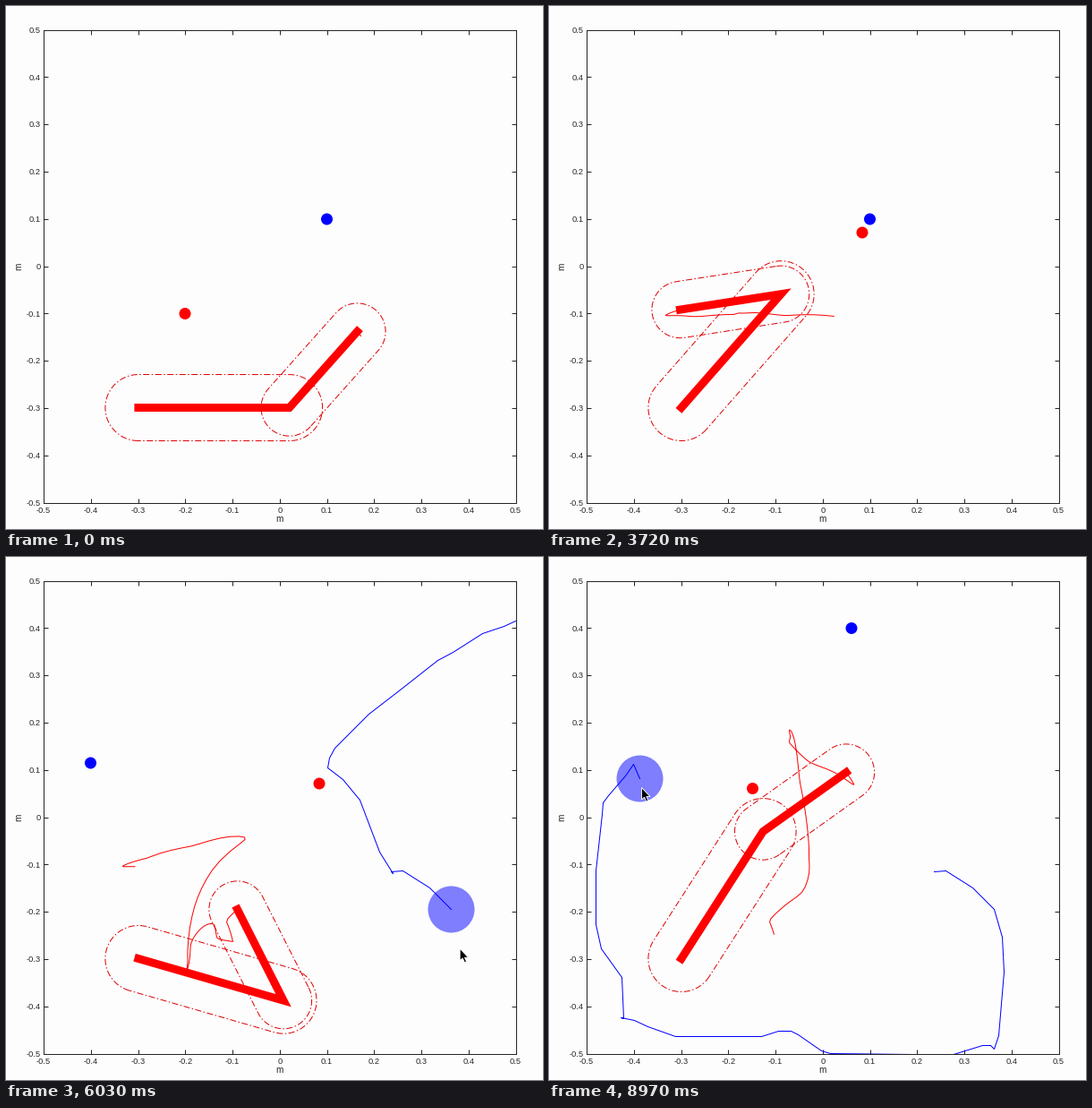
A matplotlib script for the animation above (9 s loop, 600x584 px).

```python
import numpy as np
import matplotlib.pyplot as plt
from matplotlib.animation import FuncAnimation
from matplotlib.patches import Circle, Polygon, Rectangle

W, H, DPI = 600, 584, 100
STEP, COUNT = 30, 300
PX = 72 / DPI                      # one pixel in points
LEFT, RIGHT, TOP, BOTTOM = 41.5, 569, 26, 554
TICK = (RIGHT - LEFT) / 10
INK = '#262626'

BASE = np.array([147.4, 448.0])
L1, L2 = 168.7, 114.0              # link lengths
R1, R2 = 37.0, 31.6                # safety radii
TRAIL = 3100                       # trail memory in ms
LEAD = 60                          # pointer runs ahead of the disc
SHOW = 3750                        # disc appears
FLIP = 6870                        # elbow changes side


def timed(t, start, strokes):
    """Rows of time, x, y; each stroke runs at even speed to its end time."""
    rows = [(t, *start)]
    for end, *points in strokes:
        path = np.array([rows[-1][1:], *points], float)
        run = np.cumsum(np.hypot(*np.diff(path, axis=0).T))
        part = run / run[-1] if run[-1] else [1]
        rows += [(t + (end - t) * f, *p) for f, p in zip(part, path[1:])]
        t = end
    return np.array(rows, float)


TIP = timed(-60, (396, 368), [
    (0, (392, 363)),
    (350, (383, 356), (365, 350.5)),
    (930, (330, 347.5), (268, 345)),
    (1230, (229.5, 342)),
    (1860, (217, 342.5), (211, 342.5)),
    (2730, (205, 344), (157, 346)),
    (3250, (130, 345)),
    (3860, (156, 336)),
    (4210, (208, 322), (267, 313)),
    (4620, (228, 352), (208, 398), (202.4, 444.6)),
    (4800, (201, 463)),
    (5430, (206, 432), (222, 411), (232, 410)),
    (5830, (235, 424), (253, 429)),
    (6030, (246, 407), (258, 393)),
    (FLIP, (281, 375), (290, 353), (290, 333), (281, 257), (268, 192.6)),
    (6960, (269, 199.5)),
    (7200, (269, 208)),
    (8550, (290, 228), (322, 242)),
    (8770, (340, 253)),
    (8970, (331.5, 240))])

DISC = timed(4300, (569, 71), [
    (4370, (556, 77)),
    (4615, (532, 85), (499, 106), (482, 115), (440, 148), (405, 175),
     (367, 213), (361, 224)),
    (4690, (359, 235)),
    (5060, (376, 248), (395, 271), (417, 329), (432, 353)),
    (5140, (430, 351)),
    (5870, (430, 351)),
    (6030, (443, 350), (473, 369), (497, 393)),
    (6220, (506, 424), (508, 463), (502, 534)),
    (6400, (497, 549), (493, 545), (484, 545), (450, 555.5)),
    (6540, (314, 554)),
    (6960, (304, 551), (278, 533), (270, 529), (256, 529), (237, 535),
     (141, 535), (110, 524), (95, 517)),
    (7430, (80, 514), (83, 515), (81, 469), (58, 437), (52, 410),
     (52, 350), (59, 287)),
    (8330, (60, 274), (66, 266), (85, 244), (94, 231)),
    (8760, (94, 231)),
    (8970, (101, 247)),
    (9030, (103, 257))])

RED_GOALS = [(0, 199.5, 343), (1890, 118.5, 343.5), (3270, 349.5, 252.5),
             (8780, 227, 258)]
BLUE_GOALS = [(0, 358, 237.5), (4710, 94, 229.5), (8370, 337.5, 79)]


def joints(t, x, y):
    """Inverse kinematics: shoulder angle and relative elbow angle."""
    dx, dy = x - BASE[0], y - BASE[1]
    c = (dx * dx + dy * dy - L1 ** 2 - L2 ** 2) / (2 * L1 * L2)
    side = np.where(t < FLIP, -1, 1)
    bend = side * np.arccos(np.clip(c, -1, 1))
    turn = np.arctan2(dy, dx) - np.arctan2(L2 * np.sin(bend), L1 + L2 * np.cos(bend))
    return np.unwrap(turn), bend


def smooth(t, ts, vs):
    """Monotone cubic interpolation."""
    h = np.diff(ts)
    d = np.diff(vs) / h
    same = d[:-1] * d[1:] > 0
    total = np.where(same, d[:-1] + d[1:], 1)
    m = np.concatenate([[d[0]], np.where(same, 2 * d[:-1] * d[1:] / total, 0), [d[-1]]])
    i = np.clip(np.searchsorted(ts, t, side='right') - 1, 0, len(h) - 1)
    u, k = (t - ts[i]) / h[i], h[i]
    return (vs[i] * (1 + 2 * u) * (1 - u) ** 2 + vs[i + 1] * u * u * (3 - 2 * u)
            + k * m[i] * u * (1 - u) ** 2 - k * m[i + 1] * u * u * (1 - u))


def polar(r, a):
    return np.stack([r * np.cos(a), r * np.sin(a)], axis=-1)


times = np.arange(-60, COUNT * STEP, STEP)
shoulder, bend = joints(*TIP.T)
a1 = smooth(times, TIP[:, 0], shoulder)
a2 = a1 + smooth(times, TIP[:, 0], bend)
elbows = BASE + polar(L1, a1)
tips = elbows + polar(L2, a2)


def capsule(p, q, r):
    a = np.arctan2(q[1] - p[1], q[0] - p[0])
    arc = np.linspace(np.pi / 2, 3 * np.pi / 2, 40) + a
    ring = np.vstack([p + polar(r, arc), q + polar(r, arc + np.pi)])
    return np.vstack([ring, ring[:1]])


def disc_at(t):
    return np.array([np.interp(t, DISC[:, 0], DISC[:, k]) for k in (1, 2)])


def disc_trail(t):
    t0 = max(SHOW, t - TRAIL)
    inner = DISC[(DISC[:, 0] > t0) & (DISC[:, 0] < t), 1:]
    return np.vstack([disc_at(t0), inner, disc_at(t)])


def goal(goals, t):
    return [g[1:] for g in goals if g[0] <= t][-1]


plt.rcParams['font.family'] = 'Liberation Sans'
fig = plt.figure(figsize=(W / DPI, H / DPI), dpi=DPI, facecolor='#fdfdfe')
ax = fig.add_axes([0, 0, 1, 1])
ax.set_xlim(-0.5, W - 0.5)
ax.set_ylim(H - 0.5, -0.5)
ax.axis('off')


def rule(xs, ys, color=INK):
    ax.plot(xs, ys, color=color, lw=PX, solid_capstyle='butt', zorder=1)


def label(x, y, s, size=9.3, **kw):
    ax.text(x, y, s, size=size * PX, color=INK, **kw)


frame = Rectangle((LEFT, TOP), RIGHT - LEFT, BOTTOM - TOP, fill=False,
                  ec=INK, lw=PX, zorder=1)
ax.add_patch(frame)
rule([-1, W], [583, 583], '#9a9a9a')
for i in range(11):
    x, y = LEFT + i * TICK, TOP + i * (BOTTOM - TOP) / 10
    for edge, inward in ((TOP, 5), (BOTTOM, -5)):
        rule([x, x], [edge, edge + inward])
    for edge, inward in ((LEFT, 5), (RIGHT, -5)):
        rule([edge, edge + inward], [y, y])
    label(x, 565, f'{(i - 5) / 10:g}', ha='center', va='baseline')
    label(38, y + 3.3, f'{(5 - i) / 10:g}', ha='right', va='baseline')
label(305, 576, 'm', 10, ha='center', va='baseline')
label(14, 290.5, 'm', 10, ha='center', va='center', rotation=90)


def stroke(color, width=1, **kw):
    return ax.plot([], [], color=color, lw=width * PX, **kw)[0]


red_trail = stroke('red', zorder=2)
blue_trail = stroke('blue', zorder=2)
for line in (red_trail, blue_trail):
    line.set_clip_path(frame)
dashes = (0, (7, 2.5, 1.5, 2.5))
shells = [stroke('#e00000', ls=dashes, zorder=3) for _ in range(2)]
arm = stroke('red', 9, solid_capstyle='projecting', solid_joinstyle='miter', zorder=4)
blue_dot = ax.add_patch(Circle((0, 0), 6.5, fc='blue', ec='none', zorder=5))
red_dot = ax.add_patch(Circle((0, 0), 6.5, fc='red', ec='none', zorder=5))
disc = ax.add_patch(Circle((0, 0), 26, fc='blue', ec='none', alpha=0.5, zorder=6))
ARROW = np.array([(0, 0), (0, 13.5), (3, 10.7), (5.2, 15.6), (7.4, 14.6),
                  (5.3, 10), (9.5, 10)])
pointer = ax.add_patch(Polygon(ARROW, fc='black', ec='white', lw=0.9 * PX, zorder=7))


def draw(n):
    t = n * STEP
    seen = (times >= t - TRAIL) & (times <= t)
    elbow, tip = elbows[seen][-1], tips[seen][-1]
    arm.set_data(*np.array([BASE, elbow, tip]).T)
    shells[0].set_data(*capsule(BASE, elbow, R1).T)
    shells[1].set_data(*capsule(elbow, tip, R2).T)
    red_trail.set_data(*tips[seen].T)
    red_dot.center = goal(RED_GOALS, t)
    blue_dot.center = goal(BLUE_GOALS, t)
    on = t >= SHOW
    for part in (disc, pointer, blue_trail):
        part.set_visible(on)
    if on:
        disc.center = disc_at(t)
        pointer.set_xy(ARROW + disc_at(t + LEAD))
        blue_trail.set_data(*disc_trail(t).T)
    return []


anim = FuncAnimation(fig, draw, frames=COUNT, interval=STEP, repeat=True,
                     repeat_delay=0, init_func=lambda: draw(0))
plt.show()
```
